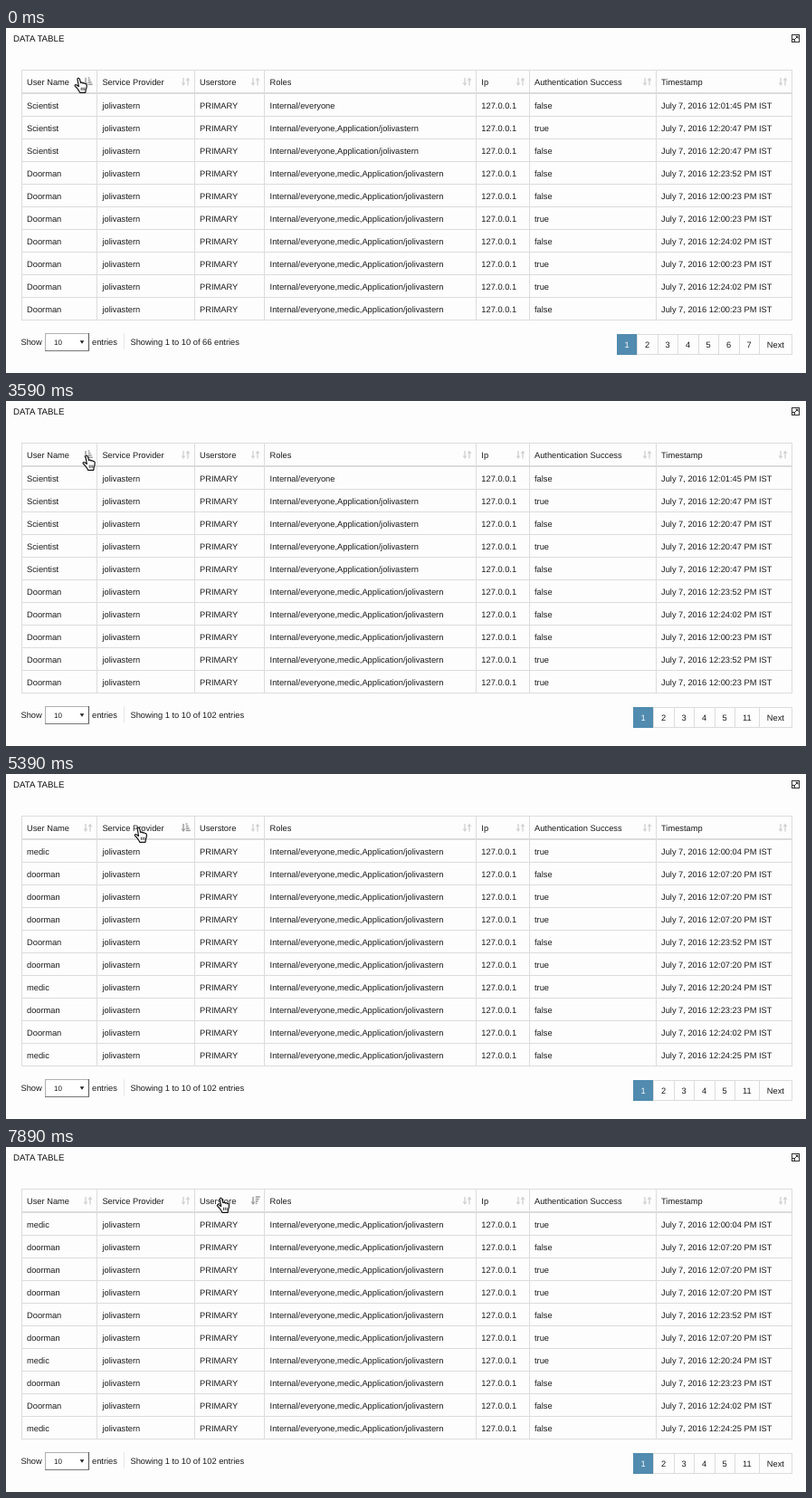
Animation of 884x381 px, one loop 8 s. Source, as an HTML page with a canvas:

```html
<!DOCTYPE html>
<html lang="en">
<head>
<meta charset="utf-8">
<title>Data table</title>
<style>
  html, body { margin: 0; width: 100%; height: 100%; overflow: hidden; background: #fdfdfd; }
  canvas { display: block; }
</style>
</head>
<body>
<canvas id="stage" width="884" height="381"></canvas>
<script>
const ctx = document.getElementById('stage').getContext('2d');
const LOOP = 8000;
const INK = '#1a1a1a', LINE = '#dcdcdc', BLUE = '#518baf', PAPER = '#fdfdfd';
const FONT = '"Liberation Sans", Arial, sans-serif';

const COLUMNS = [17, 100.4, 208, 285.6, 519.3, 578, 718, 868];
const HEADERS = ['User Name', 'Service Provider', 'Userstore', 'Roles', 'Ip', 'Authentication Success', 'Timestamp'];
const PROVIDER = 'jolivastern';
const USERS = { S: 'Scientist', D: 'Doorman', d: 'doorman', m: 'medic' };
const ROLES = [
  'Internal/everyone',
  'Internal/everyone,Application/' + PROVIDER,
  'Internal/everyone,medic,Application/' + PROVIDER
];

// Each row: user key, role index, success flag, time of day.
const TABLES = [
  'S0f12:01:45 S1t12:20:47 S1f12:20:47 D2f12:23:52 D2f12:00:23 D2t12:00:23 D2f12:24:02 D2t12:00:23 D2t12:24:02 D2f12:00:23',
  'd2f12:07:20 d2t12:07:20 d2t12:07:20 d2t12:07:20 d2f12:23:23 d2f11:57:12 d2f12:07:20 d2t12:07:20 d2f12:07:20 d2f12:07:20',
  'S0f12:01:45 S1t12:20:47 S1f12:20:47 S1t12:20:47 S1f12:20:47 D2f12:23:52 D2f12:24:02 D2f12:00:23 D2t12:23:52 D2t12:00:23',
  'm2t12:00:04 d2f12:07:20 d2t12:07:20 d2t12:07:20 D2f12:23:52 d2t12:07:20 m2t12:20:24 d2f12:23:23 D2f12:24:02 m2f12:24:25'
].map(table => table.split(' ').map(expandRow));

// start, table, sorted column, direction
const STATES = [
  [0, 0, 0, 'asc'], [1490, 1, 0, 'desc'], [3590, 2, 0, 'asc'],
  [5390, 3, 1, 'asc'], [6560, 3, 1, 'desc'],
  [7440, 3, 2, 'asc'], [7890, 3, 2, 'desc']
];

// start, left, top
const POINTER = [
  [0, 75, 54.5], [450, 80.5, 57.5], [600, 84, 59.5],
  [4190, 106.5, 64.5], [4340, 119.5, 67.5], [4490, 127.5, 60.5], [4640, 138.2, 58.5],
  [4790, 139.2, 58.5], [4940, 140.2, 58.5], [5090, 141.2, 58.5], [6290, 142.2, 58.5],
  [6700, 178.2, 63.5], [6850, 230.3, 59.5], [7000, 232.3, 55.5]
];
const BUSY = [[1200, 1490], [7290, 7440]];

const HAND = new Path2D('M4 2.4C3.6 .5 5.8 .1 6.4 1.9L7.6 6.2C8 5.4 9.8 5.5 10 6.6C10.5 5.9 12 6.2 12.2 7.2' +
  'C12.9 6.7 14.2 7.2 14.2 8.5C14.3 10.5 14 12 13.2 13.6L12.8 16.8H6.6C6.2 15 4.6 13.4 3.6 12L1.2 9.6' +
  'C.6 8.4 2 7.6 3 8.4L5.4 10Z');
const KNUCKLES = new Path2D('M8.2 11.2V14.4M10 11.2V14.4M11.8 11.2V14.4');

function expandRow(code) {
  const time = code.slice(3);
  const half = time.startsWith('11') ? 'AM' : 'PM';
  return [USERS[code[0]], PROVIDER, 'PRIMARY', ROLES[code[1]], '127.0.0.1',
    code[2] === 't' ? 'true' : 'false', `July 7, 2016 ${time} ${half} IST`];
}

const latest = (list, t) => list.filter(item => item[0] <= t).pop();

function text(value, x, y, { size = 9.3, color = INK, align = 'left' } = {}) {
  ctx.font = `${size}px ${FONT}`;
  ctx.fillStyle = color;
  ctx.textAlign = align;
  ctx.fillText(value, x, y);
}

function rect(x, y, w, h, color) {
  ctx.fillStyle = color;
  ctx.fillRect(x, y, w, h);
}

function frame(x, y, w, h, color) {
  ctx.strokeStyle = color;
  ctx.lineWidth = 1;
  ctx.strokeRect(x + .5, y + .5, w, h);
}

function polygon(color, ...points) {
  ctx.fillStyle = color;
  ctx.beginPath();
  points.forEach(([x, y]) => ctx.lineTo(x, y));
  ctx.fill();
}

function arrow(x, tip, dir, color) {
  const base = tip - dir * 3.5;
  polygon(color, [x - 2.4, base], [x + 2.4, base], [x, tip]);
  rect(x - .7, Math.min(base, base - dir * 5.5), 1.4, 5.5, color);
}

function sortIcon(right, direction) {
  const color = direction ? '#999' : '#d2d2d2';
  arrow(right - 12, 64, 1, color);
  if (!direction) return arrow(right - 7, 54.5, -1, color);
  for (let i = 0; i < 4; i++) {
    const step = direction === 'asc' ? i : 3 - i;
    rect(right - 9.3, 54.4 + i * 2.4, 1.7 + step * 1.1, 1.5, color);
  }
}

function drawExpandIcon() {
  frame(868, 7, 8, 8, '#333');
  frame(868, 12, 3, 3, '#333');
  ctx.beginPath();
  ctx.moveTo(871.5, 12.5);
  ctx.lineTo(875, 9);
  ctx.stroke();
  polygon('#333', [872, 8.7], [875.4, 8.7], [875.4, 12]);
}

function drawTable(rows, sorted, direction) {
  rect(17, 46, 852, 1, LINE);
  rect(17, 71, 852, 2, LINE);
  for (let i = 1; i <= 10; i++) rect(17, 72 + i * 25, 852, 1, LINE);
  COLUMNS.forEach(x => rect(Math.floor(x), 46, 1, 277, LINE));
  HEADERS.forEach((label, i) => {
    const x = COLUMNS[i] + 6;
    text(label, x, 63);
    sortIcon(Math.floor(COLUMNS[i + 1]), i === sorted ? direction : '');
    rows.forEach((row, r) => text(row[i], x, 89 + r * 25));
  });
}

function drawLength(total) {
  text('Show', 16.5, 350);
  rect(43, 337, 49, 20, '#fff');
  frame(43, 337, 48, 19, '#b0b0b0');
  rect(91, 337, 1, 20, '#555');
  rect(43, 356, 49, 1, '#777');
  text('10', 53, 350, { size: 8 });
  polygon('#222', [81.6, 345.2], [86.4, 345.2], [84, 348.8]);
  text('entries', 95, 350);
  rect(130, 337, 1, 18, '#e6e6e6');
  text(`Showing 1 to 10 of ${total} entries`, 137.5, 350);
}

function drawPages(pages) {
  let right = 868;
  [...pages, 'Next'].reverse().forEach(label => {
    const width = label === 'Next' ? 36 : label.length > 1 ? 27 : 22.5;
    const left = right - width;
    const x = Math.round(left), w = Math.round(right) - x;
    const active = label === '1';
    if (active) rect(x, 338, w, 23, BLUE);
    else frame(x, 338, w, 22, LINE);
    text(label, left + width / 2 + .3, 353, { color: active ? '#fff' : INK, align: 'center' });
    right = left;
  });
}

function drawPointer(x, y) {
  ctx.save();
  ctx.translate(x, y);
  ctx.fillStyle = '#fff';
  ctx.strokeStyle = '#111';
  ctx.lineJoin = 'round';
  ctx.lineWidth = 1.2;
  ctx.fill(HAND);
  ctx.stroke(HAND);
  ctx.lineWidth = .8;
  ctx.stroke(KNUCKLES);
  ctx.restore();
}

function draw(t) {
  const [, table, sorted, direction] = latest(STATES, t);
  const [, x, y] = latest(POINTER, t);
  const first = table === 0;
  rect(0, 0, 884, 381, PAPER);
  text('DATA TABLE', 8, 15, { size: 9.7, color: '#111' });
  drawExpandIcon();
  drawTable(TABLES[table], sorted, direction);
  drawLength(first ? 66 : 102);
  drawPages((first ? '1 2 3 4 5 6 7' : '1 2 3 4 5 11').split(' '));
  if (BUSY.some(([from, to]) => t >= from && t < to)) text('Processing...', 415, 283, { size: 11.16 });
  drawPointer(x, y);
}

ctx.textRendering = 'geometricPrecision';
const start = performance.now();
function tick() {
  draw((performance.now() - start) % LOOP);
  requestAnimationFrame(tick);
}
tick();
</script>
</body>
</html>
```
